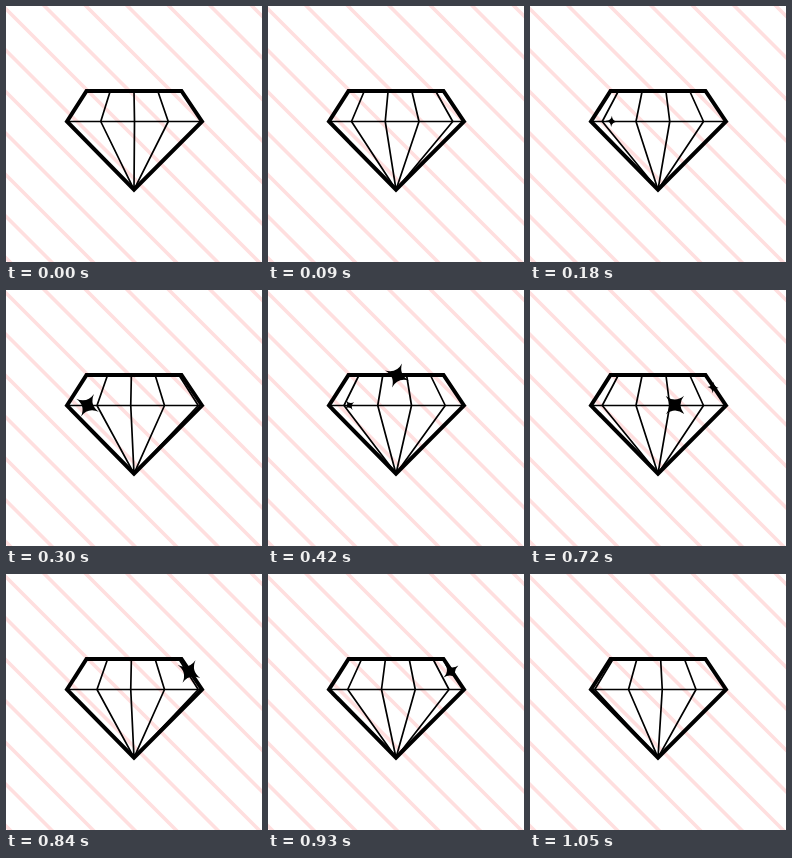
Animation of 256x256 px, one loop 1.08 s. Source, as an HTML page:

```html
<!DOCTYPE html>
<html lang="en">
<head>
<meta charset="utf-8">
<title>Diamond</title>
<style>
  html, body { margin: 0; width: 100%; height: 100%; overflow: hidden; background: #fff; }
  svg { display: block; width: 100vw; height: 100vh; }
  path { fill: none; stroke: #000; }
  .stripes { stroke: #ffdfdf; stroke-width: 3.6; }
  .outline { stroke-width: 4; }
  .facets { stroke-width: 1.7; stroke-linejoin: round; }
  .sparkle { fill: #000; stroke: none; }
</style>
</head>
<body>
<svg viewBox="0 0 256 256">
  <path class="stripes" id="stripes"/>
  <path class="facets" id="girdle"/>
  <path class="facets" id="facets"/>
  <path class="outline" id="outline"/>
  <g id="sparkles"></g>
</svg>
<script>
  const STEP = 30, FRAMES = 36, TURN = 9;
  const STRIPE_GAP = 41.5;
  const LIFE = 12, RADIUS = 13, SPIN = 60;
  const table = { left: 80.5, right: 175.5, y: 85 };
  const girdle = { left: 61, right: 196, y: 115.5 };
  const tip = "128 183.7";

  const sparkles = [
    { x: 81.5, y: 115.3, birth: 4 },
    { x: 129, y: 85.5, birth: 9 },
    { x: 145, y: 115, birth: 16 },
    { x: 183, y: 97.5, birth: 22 }
  ];

  const setPath = (id, d) => document.getElementById(id).setAttribute("d", d);
  const along = (edge, u) => `${edge.left + (edge.right - edge.left) * u} ${edge.y}`;

  let stripes = "";
  for (let x = 38.5 - 7 * STRIPE_GAP; x < 256; x += STRIPE_GAP) {
    stripes += `M${x - 10} -10l280 280`;
  }
  setPath("stripes", stripes);
  setPath("girdle", `M${along(girdle, 0)}L${along(girdle, 1)}`);
  setPath("outline", `M${along(table, 0)}L${along(table, 1)}L${along(girdle, 1)}L${tip}L${along(girdle, 0)}Z`);

  for (const s of sparkles) {
    s.node = document.createElementNS("http://www.w3.org/2000/svg", "path");
    s.node.setAttribute("class", "sparkle");
    s.node.setAttribute("d", "M0-1Q.1-.1 1 0Q.1 .1 0 1Q-.1 .1-1 0Q-.1-.1 0-1Z");
    document.getElementById("sparkles").append(s.node);
  }

  function drawFacets(f) {
    // Edges slide left by one facet per turn
    const shift = (f % TURN) / TURN;
    let d = "";
    for (let k = 1; k <= 4; k++) {
      const u = (k - shift) / 4;
      d += `M${along(table, u)}L${along(girdle, u)}L${tip}`;
    }
    setPath("facets", d);
  }

  function drawSparkle({ node, x, y, birth }, f) {
    const p = (f - birth) / LIFE;
    const alive = p > 0 && p < 1;
    node.style.display = alive ? "" : "none";
    if (!alive) return;
    // Swell, hold at full size, shrink, while the spin eases in and out
    const r = Math.min(RADIUS, 16 * Math.sin(Math.PI * p) ** 1.5);
    const deg = SPIN * p * p * (3 - 2 * p);
    node.setAttribute("transform", `translate(${x} ${y}) rotate(${deg}) scale(${r})`);
  }

  const start = performance.now();
  function tick() {
    const t = performance.now() - start;
    const f = Math.floor(t / STEP + 0.001) % FRAMES;
    drawFacets(f);
    for (const s of sparkles) drawSparkle(s, f);
    requestAnimationFrame(tick);
  }
  tick();
</script>
</body>
</html>
```
